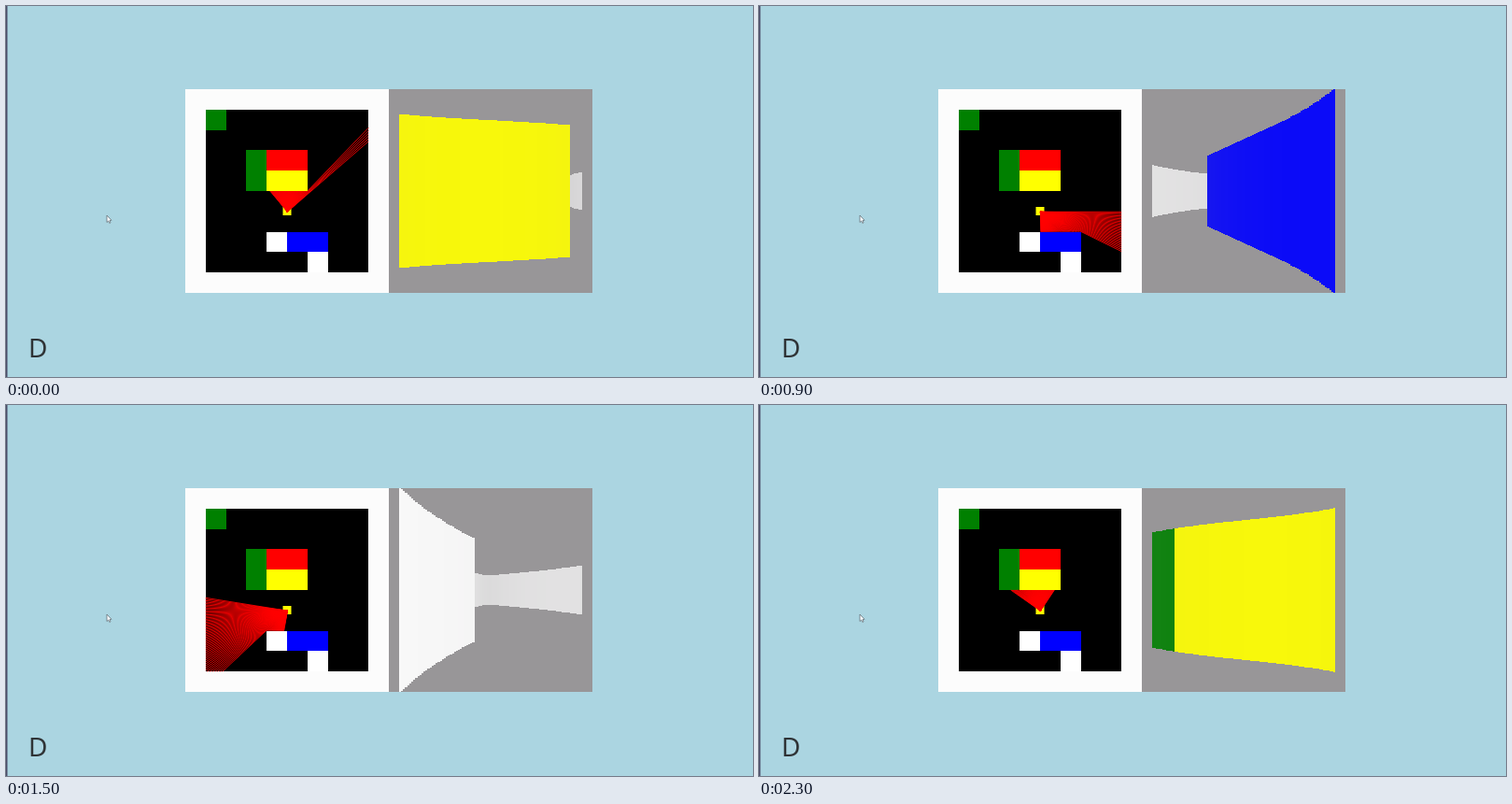
Write an HTML page with a canvas that moves like this. It is 800 px wide and 397 px high and loops after 2400 ms.

```html
<!DOCTYPE html>
<html lang="en">
<head>
<meta charset="utf-8">
<title>Ray casting</title>
<style>
html, body { margin: 0; width: 100%; height: 100%; overflow: hidden; background: #abd5e1; }
canvas { display: block; }
</style>
</head>
<body>
<canvas id="stage" width="800" height="397"></canvas>
<script>
const W = 800, H = 397;
const CELL = 21.8, LEFT = 192, TOP = 89, MID = LEFT + 10 * CELL, SIZE = 10 * CELL;
const WALL = 155, FADE = 0.07, STEP = 100;
const player = { x: 5.0183, y: 6.0193 };
const colors = { W: '#fff', G: '#008000', R: '#f00', Y: '#ff0', B: '#00f' };
const grid = [
  'WWWWWWWWWW',
  'WG.......W',
  'W........W',
  'W..GRR...W',
  'W..GYY...W',
  'W........W',
  'W........W',
  'W...WBB..W',
  'W.....W..W',
  'WWWWWWWWWW'
];
// Heading in degrees clockwise from up; two values are shown as a blend.
const turns = [
  [5], [20], [35], [50], [60, 70], [80], [90], [100, 110],
  [120], [135], [155], [170], [185], [205], [220], [235],
  [250], [265], [280], [290, 295], [305], [320], [335], [350]
];

const ctx = document.getElementById('stage').getContext('2d');
const layer = document.createElement('canvas');
layer.width = W;
layer.height = H;
const layerCtx = layer.getContext('2d');

function box(c, x, y, w, h, color) {
  const x0 = Math.round(x), y0 = Math.round(y);
  c.fillStyle = color;
  c.fillRect(x0, y0, Math.round(x + w) - x0, Math.round(y + h) - y0);
}

function cast(deg) {
  const a = deg * Math.PI / 180;
  const dx = Math.sin(a), dy = -Math.cos(a);
  const sx = Math.sign(dx), sy = Math.sign(dy);
  const ix = Math.abs(1 / dx), iy = Math.abs(1 / dy);
  let cx = Math.floor(player.x), cy = Math.floor(player.y);
  let tx = (sx > 0 ? cx + 1 - player.x : player.x - cx) * ix;
  let ty = (sy > 0 ? cy + 1 - player.y : player.y - cy) * iy;
  let dist = 0;
  while (grid[cy][cx] === '.') {
    if (tx < ty) { dist = tx; tx += ix; cx += sx; }
    else { dist = ty; ty += iy; cy += sy; }
  }
  return { dist, dx, dy, kind: grid[cy][cx] };
}

function drawMap(c) {
  box(c, LEFT, TOP, SIZE, SIZE, '#fcfcfc');
  box(c, LEFT + CELL, TOP + CELL, 8 * CELL, 8 * CELL, '#000');
  for (let y = 1; y < 9; y++) {
    for (let x = 1; x < 9; x++) {
      const kind = grid[y][x];
      if (kind !== '.') box(c, LEFT + x * CELL, TOP + y * CELL, CELL, CELL, colors[kind]);
    }
  }
  c.fillStyle = '#ff0';
  c.fillRect(296.5, 215, 9, 9);
}

function drawRays(c, heading) {
  const px = LEFT + player.x * CELL, py = TOP + player.y * CELL;
  const width = SIZE / 100;
  c.strokeStyle = '#f00';
  c.lineWidth = 0.9;
  for (let i = -45; i < 45; i++) {
    const ray = cast(heading + i);
    const len = ray.dist * CELL;
    c.beginPath();
    c.moveTo(px, py);
    c.lineTo(px + ray.dx * len, py + ray.dy * len);
    c.stroke();

    const depth = ray.dist * Math.cos(i * Math.PI / 180);
    const h = Math.min(SIZE, WALL / depth);
    c.globalAlpha = 1 - FADE * ray.dist;
    box(c, MID + (i + 50) * width, TOP + (SIZE - h) / 2, width, h, colors[ray.kind]);
    c.globalAlpha = 1;
  }
}

function drawCursor(c) {
  c.beginPath();
  [[108, 224], [108, 231.5], [109.7, 230], [110.8, 232.4], [112, 231.8], [111, 229.5], [113, 229.3]]
    .forEach(([x, y]) => c.lineTo(x, y));
  c.closePath();
  c.fillStyle = '#f4f8fa';
  c.fill();
  c.strokeStyle = '#56636a';
  c.lineWidth = 0.7;
  c.stroke();
}

function drawScene(c, heading) {
  box(c, 0, 0, W, H, '#abd5e1');
  c.fillStyle = '#4b4c68';
  c.fillRect(0, 0, 1.5, H);
  drawMap(c);
  box(c, MID, TOP, SIZE, SIZE, '#989698');
  drawRays(c, heading);
  drawCursor(c);
  c.fillStyle = '#2f3336';
  c.font = '28px "Noto Sans", "Open Sans", sans-serif';
  c.fillText('D', 24, 376);
}

let shown = -1;
function tick(now) {
  const step = Math.floor(now / STEP) % turns.length;
  if (step !== shown) {
    shown = step;
    const [first, second] = turns[step];
    drawScene(ctx, first);
    if (second !== undefined) {
      drawScene(layerCtx, second);
      ctx.globalAlpha = 0.5;
      ctx.drawImage(layer, 0, 0);
      ctx.globalAlpha = 1;
    }
  }
  requestAnimationFrame(tick);
}
tick(0);
</script>
</body>
</html>
```
